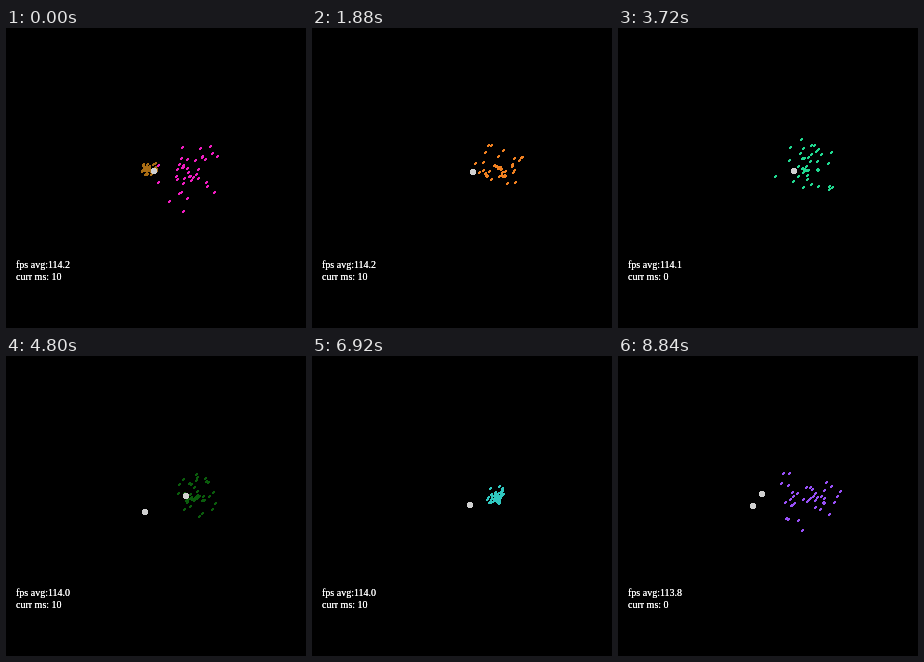
These frames come from a looping animation (300 by 300 pixels, 8940 ms). An HTML page with a canvas:

```html
<!DOCTYPE html>
<html>
<head>
<meta charset="utf-8">
<style>
html, body { margin: 0; height: 100%; overflow: hidden; background: #000; }
canvas { display: block; }
</style>
</head>
<body>
<canvas id="stage" width="300" height="300"></canvas>
<script>
const ctx = document.getElementById('stage').getContext('2d');
const LOOP = 8940, STEP = 40, FLIGHT = 700, LIFE = 580, SPARKS = 40, LAUNCH_X = 132;

// burst time, burst x, burst y, launch y, spark colour
const shots = [
  [-520, 184, 148, 152, '#f01cc0'],
  [-65, 143, 140, 150, '#a86c14'],
  [467, 180, 142, 146, '#b0ff00'],
  [1005, 187, 137, 152, '#10b8e0'],
  [1595, 186, 140, 153, '#f08020'],
  [2190, 184, 144, 152, '#f80850'],
  [3107, 192, 135, 140, '#3c70f0'],
  [3314, 188, 142, 155, '#20d890'],
  [3850, 186, 143, 152, '#d0a030'],
  [4570, 191, 140, 150, '#0a5c0c'],
  [4900, 188, 139.5, 152, '#5058e8'],
  [5415, 186, 138, 168, '#e04030'],
  [5680, 176, 147, 152, '#5cff08'],
  [6130, 196, 138, 152, '#f0508c'],
  [6832, 184, 140, 147, '#30c8c0'],
  [7330, 195, 148, 153, '#ffff00'],
  [8217, 178, 138, 138, '#70a828'],
  [8263, 189, 143, 162, '#9850f8'],
  [9395, 190, 137.5, 139, '#fff'],
  [9499, 184, 140, 153, '#fff']
];

function seeded(seed) {
  let s = seed * 7919 + 17;
  return () => (s = (s * 16807) % 2147483647) / 2147483647;
}

// Hard-edged pixel shapes
function spark(x, y) {
  x = Math.round(x);
  y = Math.round(y);
  ctx.fillRect(x - 1, y, 3, 1);
  ctx.fillRect(x, y - 1, 2, 1);
  ctx.fillRect(x - 1, y + 1, 2, 1);
}

function ball(x, y) {
  x = Math.round(x);
  y = Math.round(y);
  ctx.fillRect(x - 3, y - 2, 6, 4);
  ctx.fillRect(x - 2, y - 3, 4, 6);
}

function drawBurst(index, age) {
  const [, x, y, , color] = shots[index];
  const radius = 46 * (1 - Math.exp(-age / 330));
  const rnd = seeded(index + 1);
  for (let i = 0; i < 5; i++) rnd();
  ctx.fillStyle = color;
  for (let i = 0; i < SPARKS; i++) {
    const angle = rnd() * 2 * Math.PI, d = rnd() * radius;
    spark(x + d * Math.cos(angle), y + d * Math.sin(angle));
  }
}

function drawBall([, x, y, launchY], p) {
  ctx.fillStyle = '#d0d0d0';
  ball(LAUNCH_X + (x - LAUNCH_X) * p, y + (launchY - y) * (1 - p) ** 4);
}

function averageFps(t) {
  return t < 3560 ? '114.2' : t < 4520 ? '114.1' : t < 6960 ? '114.0' : t < 8300 ? '113.9' : '113.8';
}

function label(text, y) {
  ctx.fillStyle = '#fff';
  ctx.font = '10px "Liberation Serif", serif';
  for (let pass = 0; pass < 2; pass++) ctx.fillText(text, 10, y); // second pass hardens the edges
}

function draw(now) {
  let t = Math.min(Math.floor(now % LOOP / STEP) * STEP, 8840);
  if (t > 1320 && t < 1760) t = 1320; // the display stalls here
  ctx.fillStyle = '#000';
  ctx.fillRect(0, 0, 300, 300);

  shots.forEach(([time], i) => {
    const age = t - time;
    if (age >= 0 && age < LIFE) drawBurst(i, age);
  });
  shots.forEach(shot => {
    const p = 1 + (t - shot[0]) / FLIGHT;
    if (p >= 0 && p < 1) drawBall(shot, p);
  });

  label('fps avg:' + averageFps(t), 240);
  label('curr ms: ' + ('1100010'[t / STEP % 7] === '1' ? 10 : 0), 252);
}

const start = performance.now();
function tick() {
  draw(performance.now() - start);
  requestAnimationFrame(tick);
}
tick();
</script>
</body>
</html>
```
